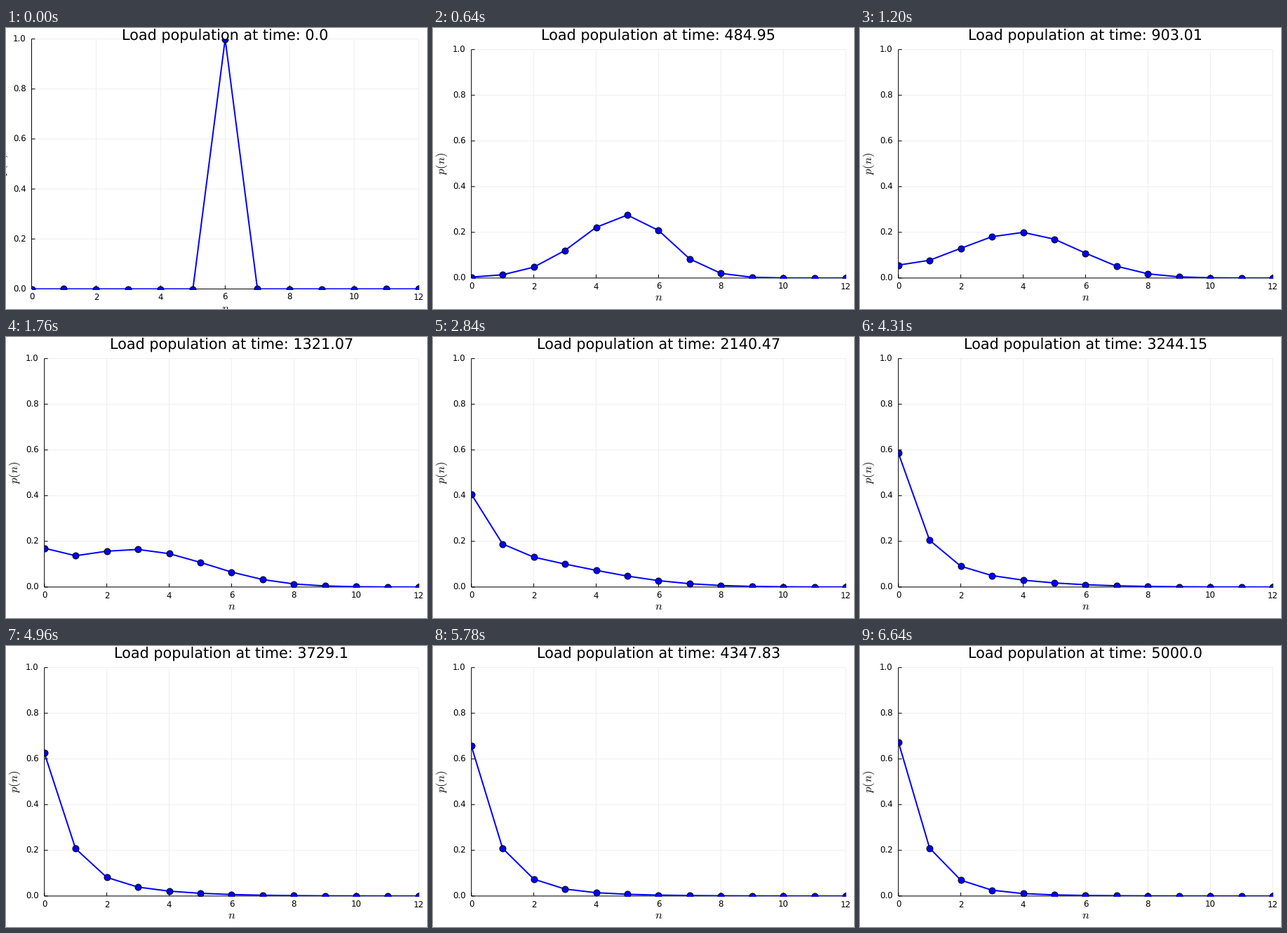
Animation, 600 px wide and 400 px high, one loop 6660 ms. Source, as a matplotlib script:

```python
import numpy as np
import matplotlib.pyplot as plt
from matplotlib.animation import FuncAnimation
from matplotlib.patches import Rectangle

plt.rcParams.update({
    "font.family": "DejaVu Sans",
    "mathtext.fontset": "cm",
    "text.hinting": "none",
    "path.snap": False,
})

W, H, DPI = 600, 400, 100
PX = 72 / DPI                     # points per pixel
LEVELS, START, STEPS, T_END, FPS = 13, 6, 300, 5000, 45
TICK_MS, TICKS = 10, 666

# A two-state machine trades quanta with the ladder and thermalises.
SWAP, RELAX, RATIO = 0.00575, 0.0523, 0.303
HOT = RATIO / (1 + RATIO)

times = np.linspace(0, T_END, STEPS)


def populations():
    """Level populations over time; state 2n + s is level n, machine s."""
    size = 2 * LEVELS
    gen = np.kron(np.eye(LEVELS), RELAX * np.array([[0, 1 - HOT], [HOT, 0]]))
    for i in range(1, size - 1, 2):
        gen[i, i + 1] = gen[i + 1, i] = SWAP
    gen -= np.diag(gen.sum(axis=0))
    start = np.zeros(size)
    start[2 * START:2 * START + 2] = 1 - HOT, HOT
    vals, vecs = np.linalg.eig(gen)
    coef = np.linalg.solve(vecs, start)
    probs = np.real((np.exp(np.outer(times, vals)) * coef) @ vecs.T)
    return probs.reshape(STEPS, LEVELS, 2).sum(axis=2)


pops = populations()

fig = plt.figure(figsize=(W / DPI, H / DPI), dpi=DPI, facecolor="white")
ax = fig.add_axes([0, 0, 1, 1])
ax.set(xlim=(0, W), ylim=(H, 0))
ax.axis("off")


class Panel:
    def __init__(self, left, right, top, bottom):
        self.left, self.right, self.top, self.bottom = left, right, top, bottom
        self.parts = []
        mid_x, mid_y = (left + right) / 2, (top + bottom) / 2

        xs = [(n, self.x(n)) for n in range(0, LEVELS, 2)]
        ys = [(p / 10, self.y(p / 10)) for p in range(0, 11, 2)]
        grid = dict(color="#eeeeee", lw=1 * PX)
        axis = dict(color="black", lw=1 * PX)
        for _, x in xs:
            self.line([x, x], [top, bottom], **grid)
        for _, y in ys:
            self.line([left, right], [y, y], **grid)
        self.line([left, right], [bottom, bottom], **axis)
        self.line([left, left], [top, bottom], **axis)
        for n, x in xs:
            self.line([x, x], [bottom, bottom - 5], **axis)
            self.text(x, bottom + 15.8, str(n), 8.45)
        for p, y in ys:
            self.line([left, left + 5], [y, y], **axis)
            self.text(left - 8, y + 4.2, f"{p:.1f}", 8.45, ha="right")

        self.text(mid_x, bottom + 32.3, "$n$", 11.9)
        self.text(left - 41.8, mid_y, "$p(n)$", 11.9, rotation=90, va="center")

        self.curve = self.line(
            [], [], color="blue", lw=2 * PX, marker="o", ms=9 * PX,
            mec="black", mew=1 * PX)
        self.curve.set_clip_path(
            Rectangle((left, top), right - left, bottom - top,
                      transform=ax.transData))
        self.title = self.text(mid_x, 18, "", 14.93)

    def x(self, n):
        return self.left + (self.right - self.left) * n / (LEVELS - 1)

    def y(self, p):
        return self.bottom - (self.bottom - self.top) * p

    def line(self, x, y, **style):
        art, = ax.plot(x, y, solid_capstyle="butt", **style)
        self.parts.append(art)
        return art

    def text(self, x, y, s, size, ha="center", va="baseline", **kw):
        art = ax.text(x, y, s, size=size, ha=ha, va=va, **kw)
        self.parts.append(art)
        return art

    def show(self, on):
        for art in self.parts:
            art.set_visible(on)

    def update(self, step):
        self.curve.set_data(self.x(np.arange(LEVELS)), self.y(pops[step]))
        self.title.set_text(
            f"Load population at time: {round(float(times[step]), 2)}")


# The very first picture has tighter margins than all later ones.
first = Panel(36.5, 588.2, 15.6, 371.5)
later = Panel(54.7, 588.2, 30.7, 355.9)


def draw(tick):
    step = int((tick + 0.5) * TICK_MS * FPS / 1000)
    panel = later if step else first
    first.show(panel is first)
    later.show(panel is later)
    panel.update(step)
    return panel.parts


anim = FuncAnimation(fig, draw, frames=TICKS, interval=TICK_MS,
                     init_func=lambda: [], repeat=True, repeat_delay=0)
plt.show()
```
